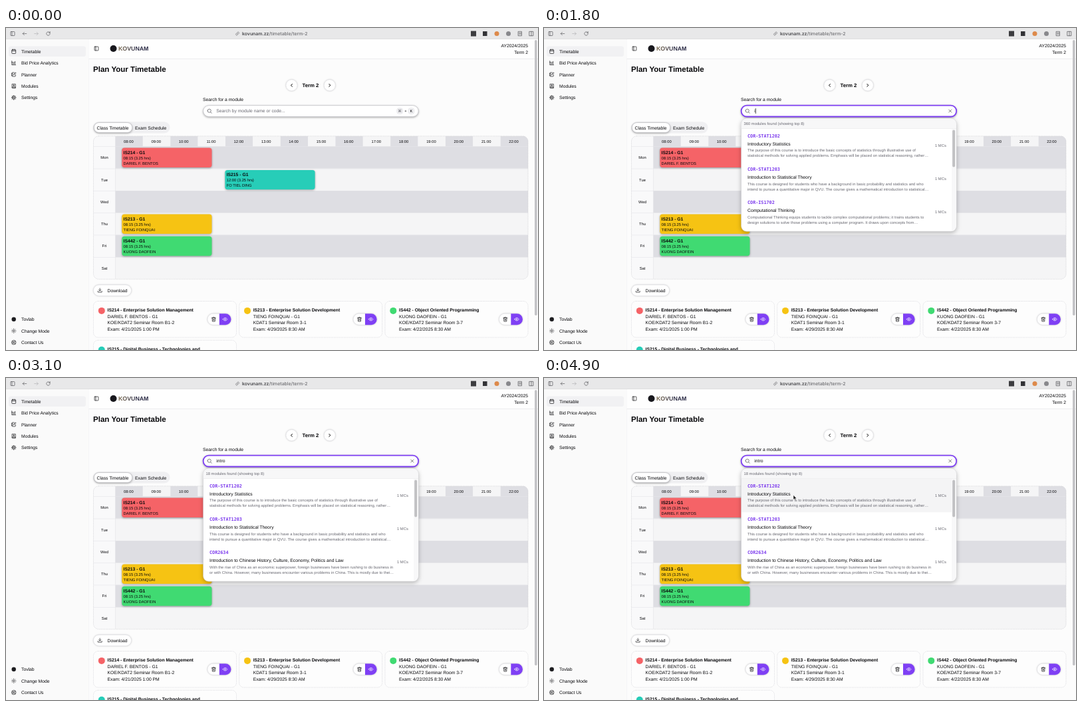
Recreate the animation shown at these times as an HTML page. Size 800 px wide and 485 px high, loop 5000 ms.

```html
<!DOCTYPE html>
<html lang="en">
<head>
<meta charset="utf-8">
<title>Plan Your Timetable</title>
<style>
html, body { margin: 0; width: 100%; height: 100%; overflow: hidden; background: #fcfcfc; }
svg { display: block; width: 800px; height: 485px; }
text { font-family: "Liberation Sans", Arial, sans-serif; font-size: 6.78px; fill: #08080b; white-space: pre; text-rendering: geometricPrecision; }
.b { font-weight: 700; }
.s { font-size: 5.82px; }
.l { font-size: 7.75px; }
.h { font-size: 11.55px; }
.logo { font-size: 8.8px; fill: url(#ink); }
.g { fill: #686871; }
.m { text-anchor: middle; }
.e { text-anchor: end; }
.code { font-family: "DejaVu Sans Mono", monospace; font-weight: 700; fill: #7c3aed; }
.url { font-family: Inter, sans-serif; font-weight: 500; font-size: 6.9px; fill: #6c6c70; }
.url tspan { font-weight: 600; fill: #48484c; }
.sh { filter: drop-shadow(0 .5px .8px #0003); }
.bar { filter: drop-shadow(.3px 1px 1.4px #0005); }
.pop { filter: drop-shadow(0 2px 3px #0004); }
</style>
</head>
<body>
<svg id="stage" viewBox="0 0 800 485"></svg>
<script>
const stage = document.getElementById('stage');
const PURPLE = '#7f40f4', RED = '#f56367', TEAL = '#27cdb8', GOLD = '#f6c313', GREEN = '#40da72';
const LINE = '#e0e0e4', GREY = '#dedee3', PALE = '#f5f5f6', INK = '#1c1c1f';

const box = (x, y, w, h, fill, r = 0, more = '') =>
  `<rect x="${x}" y="${y}" width="${w}" height="${h}" rx="${r}" fill="${fill}" ${more}/>`;
const edge = (color = LINE, w = .6) => `stroke="${color}" stroke-width="${w}"`;
const dashed = edge('#d2d2d7') + ' stroke-dasharray="1.5 1"';
const dot = (x, y, r, fill, more = '') => `<circle cx="${x}" cy="${y}" r="${r}" fill="${fill}" ${more}/>`;
const text = (x, y, str, cls = '') => `<text x="${x}" y="${y}" class="${cls}">${str}</text>`;
// icons live on a 24-unit grid centred on (x, y)
const icon = (x, y, d, size = 7.8, color = INK, w = 2.2) =>
  `<path transform="translate(${x - size / 2} ${y - size / 2}) scale(${size / 24})" d="${d}" fill="none" stroke="${color}" stroke-width="${w}" stroke-linecap="round" stroke-linejoin="round"/>`;
const ring = r => `M${12 - r} 12a${r} ${r} 0 1 0 ${2 * r} 0a${r} ${r} 0 1 0 ${-2 * r} 0`;
const rays = (a, b, n, turn = 0) => Array.from({ length: n }, (_, i) => {
  const q = (i + turn) / n * 2 * Math.PI, c = Math.cos(q), s = Math.sin(q);
  return `M${12 + a * c} ${12 + a * s}L${12 + b * c} ${12 + b * s}`;
}).join('');

const ICON = {
  calendar: 'M5 4h14a2 2 0 0 1 2 2v14a2 2 0 0 1-2 2H5a2 2 0 0 1-2-2V6a2 2 0 0 1 2-2zM8 2v4M16 2v4M3 10h18',
  chart: 'M3 3v18h18M8 17v-4M13 17V8M18 17V5M3 9h5',
  pen: 'M13 3H6a2 2 0 0 0-2 2v14a2 2 0 0 0 2 2h12a2 2 0 0 0 2-2v-6M2 7h4M2 12h4M2 17h4M20 3l2 2-8 8-3 1 1-3z',
  book: 'M5 3h15v19H6a2 2 0 0 1-2-2V4zM4 18h16M9 14l3-8 3 8M10 11.5h4',
  gear: ring(3) + ring(7.5) + rays(7.5, 10.5, 8),
  sun: ring(4) + rays(8, 10, 8),
  buoy: ring(10) + ring(4) + rays(4, 10, 4, .5),
  panel: 'M5 3h14a2 2 0 0 1 2 2v14a2 2 0 0 1-2 2H5a2 2 0 0 1-2-2V5a2 2 0 0 1 2-2zM9 3v18',
  split: 'M4 3h16v18H4zM12 3v18',
  list: 'M5 3h14v18H5zM8 9h8M8 14h8',
  back: 'M21 12H3M10 5l-7 7 7 7',
  forward: 'M3 12h18M14 5l7 7-7 7',
  reload: 'M20 12a8 8 0 1 1-3-6.2L20 8M20 3v5h-5',
  link: 'M10 14a5 5 0 0 0 7 0l3-3a5 5 0 0 0-7-7l-2 2M14 10a5 5 0 0 0-7 0l-3 3a5 5 0 0 0 7 7l2-2',
  left: 'M15 18l-6-6 6-6',
  right: 'M9 18l6-6-6-6',
  search: 'M3 11a8 8 0 1 0 16 0a8 8 0 1 0-16 0M17 17l5 5',
  close: 'M5 5l14 14M19 5L5 19',
  download: 'M12 3v12M7 10l5 5 5-5M3 16v5h18v-5',
  trash: 'M3 6h18M8 6V3h8v3M5 6l1 16h12l1-16M10 11v6M14 11v6',
  eye: 'M2 12c5-9 15-9 20 0c-5 9-15 9-20 0z' + ring(3)
};

function browserBar() {
  const c = '#5c5c60';
  return box(0, 0, 800, 17, '#e8e8e9') + box(0, 16.6, 800, .6, '#cfcfd1') +
    icon(10, 8.5, ICON.panel, 8, c) + icon(28, 8.5, ICON.back, 7.5, c) +
    icon(45.5, 8.5, ICON.forward, 7.5, '#b4b4b7') + icon(63.5, 8.5, ICON.reload, 8, c) +
    icon(348, 8.5, ICON.link, 6.5, c) + text(355, 11, '<tspan>kovunam.zz</tspan>/timetable/term-2', 'url') +
    box(699, 4.5, 8, 8, '#3c3c3f') + box(717, 5, 6.5, 7, '#333336') +
    dot(738, 8.5, 3.5, '#dd8a4b') + dot(755.5, 8.5, 3.5, '#88888c') +
    icon(773, 8.5, ICON.list, 8.5, c) + icon(790, 8.5, ICON.split, 8.5, c);
}

function sidebar() {
  const top = [['Timetable', 'calendar'], ['Bid Price Analytics', 'chart'], ['Planner', 'pen'], ['Modules', 'book'], ['Settings', 'gear']];
  const end = [['Tovlab'], ['Change Mode', 'sun'], ['Contact Us', 'buoy']];
  const items = (list, y0) => list.map(([name, key], i) => {
    const y = y0 + i * 17.4;
    return (key ? icon(11.7, y, ICON[key]) : dot(11.7, y, 3.2, INK)) + text(23, y + 2.5, name);
  }).join('');
  return box(0, 17, 124, 468, '#fafafa') + box(124, 17, .5, 468, '#ededf0') +
    box(4, 27.5, 116, 15.6, '#f1f1f3', 3) + items(top, 35.2) + items(end, 438.8);
}

function header() {
  const arrow = (x, key) => dot(x, 86.3, 8.5, '#fff', edge() + ' class="sh"') + icon(x, 86.3, ICON[key], 8, '#000', 3);
  return box(124.5, 17, 675.5, 29, '#fefefe') + box(124.5, 46, 675.5, .6, '#e4e4e7') +
    icon(136, 31, ICON.panel) + dot(161.5, 31, 5, '#17171c') + text(169, 34, 'KOVUNAM', 'b logo') +
    text(785, 29, 'AY2024/2025', 'e') + text(785, 38.5, 'Term 2', 'e') +
    text(131, 66, 'Plan Your Timetable', 'b h') +
    arrow(429.5, 'left') + arrow(486.8, 'right') + text(458, 89, 'Term 2', 'b l m') +
    text(296, 110, 'Search for a module') +
    box(131, 141.3, 115.5, 17.2, '#f0f0f2', 8.6) +
    box(132.3, 142.5, 57.5, 15, '#fff', 7.5, edge('#b5b5ba') + ' class="bar"') +
    text(136.5, 152.5, 'Class Timetable') + text(194, 152.5, 'Exam Schedule');
}

function timetable() {
  const X = 164.5, Y = 178.5, COL = 41.37, ROW = 33.3;
  let out = box(131.5, 162.8, 653.5, 215.5, '#f9f9fa');
  for (let i = 0; i < 15; i++) {
    out += box(X + i * COL, 162.8, COL, 15.7, i % 2 ? PALE : GREY) +
      text(X + (i + .48) * COL, 173, String(i + 8).padStart(2, '0') + ':00', 's m');
  }
  ['Mon', 'Tue', 'Wed', 'Thu', 'Fri', 'Sat'].forEach((day, i) => {
    const y = Y + i * ROW;
    out += box(X, y, 620.5, ROW, i % 2 ? PALE : GREY) + box(131.5, y, 653.5, .5, '#e0e0e4') + text(148, y + 18.7, day, 's m');
  });
  out = `<g clip-path="url(#table)">${out}${box(X - .3, 162.8, .5, 215.5, '#e0e0e4')}</g>` +
    box(131.5, 162.8, 653.5, 215.5, 'none', 8, edge('#c9c9ce') + ' stroke-dasharray="1.5 1"');
  const lesson = (row, x, color, code, time, who) => {
    const y = Y + row * ROW + 2.1;
    return box(x, y, 135.2, 29.4, color, 3.7, 'class="bar"') + text(x + 2.3, y + 9.4, code + ' - G1', 'b') +
      text(x + 2.3, y + 17.4, time + ' (3.25 hrs)', 's') + text(x + 2.3, y + 25.3, who, 's');
  };
  return out + lesson(0, 174.3, RED, 'IS214', '08:15', 'DARIEL F. BENTOS') +
    lesson(1, 329.4, TEAL, 'IS215', '12:00', 'FO TIEL DING') +
    lesson(3, 174.3, GOLD, 'IS213', '08:15', 'TIENG FOINQUAI') +
    lesson(4, 174.3, GREEN, 'IS442', '08:15', 'KUONG DAOFEIN');
}

function card(x, y, color, lines) {
  const cy = y + 27.2;
  return box(x, y, 215, 54.5, '#fdfdfd', 7, dashed) + dot(x + 12.3, y + 14.4, 5, color) +
    lines.map((s, i) => text(x + 21, y + 15.3 + i * 9.7, s, i ? '' : 'b')).join('') +
    box(x + 171.5, cy - 8.5, 35.5, 17, '#fff', 8.5, edge() + ' class="sh"') +
    `<path d="M${x + 189.3} ${cy - 8.5}h9.2a8.5 8.5 0 0 1 0 17h-9.2z" fill="${PURPLE}"/>` +
    icon(x + 180.8, cy, ICON.trash) + icon(x + 198, cy, ICON.eye, 7.8, '#fff');
}

function cards() {
  return box(131.5, 387, 57, 16.5, '#fff', 8.2, edge() + ' class="sh"') + icon(141.2, 395, ICON.download) + text(152.5, 397.5, 'Download') +
    card(131.5, 411.5, RED, ['IS214 - Enterprise Solution Management', 'DARIEL F. BENTOS - G1', 'KOE/KDAT2 Seminar Room B1-2', 'Exam: 4/21/2025 1:00 PM']) +
    card(350.7, 411.5, GOLD, ['IS213 - Enterprise Solution Development', 'TIENG FOINQUAI - G1', 'KDAT1 Seminar Room 3-1', 'Exam: 4/29/2025 8:30 AM']) +
    card(570, 411.5, GREEN, ['IS442 - Object Oriented Programming', 'KUONG DAOFEIN - G1', 'KOE/KDAT2 Seminar Room 3-7', 'Exam: 4/22/2025 8:30 AM']) +
    card(131.5, 470.3, TEAL, ['IS215 - Digital Business - Technologies and']) +
    box(795, 18, 3.6, 415, '#c3c3c6', 1.8);
}

const MODULES = {
  stats: ['COR-STAT1202', 'Introductory Statistics',
    'The purpose of this course is to introduce the basic concepts of statistics through illustrative use of',
    'statistical methods for solving applied problems. Emphasis will be placed on statistical reasoning, rather…'],
  theory: ['COR-STAT1203', 'Introduction to Statistical Theory',
    'This course is designed for students who have a background in basic probability and statistics and who',
    'intend to pursue a quantitative major in QVU. The course gives a mathematical introduction to statistical…'],
  thinking: ['COR-IS1702', 'Computational Thinking',
    'Computational Thinking equips students to tackle complex computational problems; it trains students to',
    'design solutions to solve those problems using a computer program. It draws upon concepts from…'],
  law: ['COR-LAW2215', 'Digital Intelligence for Lawyers',
    'This course employs a top-down approach to introduce high-level concepts in digital technology to (1) future',
    'lawyers who expect to work closely on legal/policy matters that intersect with technology and (2) future le…'],
  china: ['COR2634', 'Introduction to Chinese History, Culture, Economy, Politics and Law',
    'With the rise of China as an economic superpower, foreign businesses have been rushing to do business in',
    'or with China. However, many businesses encounter various problems in China. This is mostly due to thei…']
};

// time, typed text, hits, third result
const KEYS = [
  [1600, 'i', 360, 'thinking'], [1900, 'in', 288, 'thinking'], [2000, 'int', 96, 'thinking'],
  [2100, 'intr', 47, 'law'], [2300, 'intro', 18, 'china']
];
const FOCUS = 1200;

function dropdown(hits, third, hover) {
  const rows = ['stats', 'theory', third].map((key, i) => {
    const [code, name, a, b] = MODULES[key], y = 152 + i * 50.2;
    return (hover && !i ? box(297, y, 316, 50.2, '#f4f4f5') : '') + text(306, y + 12.8, code, 'code') +
      text(306, y + 24.7, name) + text(306, y + 34.4, a, 's g') + text(306, y + 42.3, b, 's g') + text(588, y + 27, '1 MCs', 's g');
  }).join('');
  return box(296.6, 136.3, 323.6, 170, '#fff', 8, edge('#d0d0d5') + ' class="pop"') +
    `<g clip-path="url(#menu)">${box(296, 136, 325, 15.6, '#f7f7f8')}${box(296, 151.5, 325, .5, '#e4e4e7')}` +
    rows + box(613, 152, 8, 155, '#f8f8f9') + box(614.2, 153.5, 3.9, 56, '#c1c1c3', 1.9) + '</g>' +
    text(300.5, 145.7, hits + ' modules found (showing top 8)', 's g');
}

function searchBox(t, typed) {
  const on = t >= FOCUS;
  const since = t - (typed ? Math.min(t, 2400) : FOCUS);
  const caret = on && since % 1000 < 500;
  const width = [0, 1.5, 5.3, 7.2, 9.5, 13.3][typed.length];
  let out = box(296.6, 116.7, 323.6, 16.8, '#fff', 8.4, (on ? edge(PURPLE, 1.8) : edge('#c4c4c9', .8)) + ' class="bar"') +
    icon(306, 125, ICON.search, 7.8, '#55555c');
  if (typed) out += text(316.3, 127.4, typed) + icon(610.8, 125, ICON.close, 7, '#333338');
  else {
    out += text(316.3, 127.4, 'Search by module name or code...', 'g') +
      box(587.8, 120.7, 8.8, 8.6, '#f0f0f2', 3, edge()) + text(592.2, 127, '⌘', 's g m') +
      text(601, 127, '+', 's m') + box(605, 120.7, 8.8, 8.6, '#f0f0f2', 3, edge()) + text(609.4, 127, 'K', 's m');
  }
  return out + (caret ? box(316.4 + width, 121, .7, 8, '#111') : '');
}

function pointer(t) {
  const move = (from, to, start, end) => {
    const p = Math.min(1, (t - start) / (end - start)), k = 1 - (1 - p) ** 2;
    return from.map((v, i) => v + (to[i] - v) * k);
  };
  const field = [360, 123.6];
  if (t >= 700 && t < KEYS[0][0]) return move([430, 488], field, 700, 1200);
  if (t >= 4400) return move(field, [375, 176.4], 4400, 4900);
}

const arrow = ([x, y]) =>
  `<path transform="translate(${x} ${y})" d="M0 0V6.8L1.6 5.4L2.7 8L3.8 7.5L2.7 5H4.9Z" fill="#111" stroke="#fff" stroke-width=".5"/>`;

stage.innerHTML = `<defs>
  <linearGradient id="ink"><stop stop-color="#7b6a4f"/><stop offset=".6" stop-color="#33334a"/><stop offset="1" stop-color="#23233f"/></linearGradient>
  <clipPath id="table">${box(131.5, 162.8, 653.5, 215.5, '#000', 8)}</clipPath>
  <clipPath id="menu">${box(296.8, 136.5, 323.2, 169.6, '#000', 8)}</clipPath>
</defs>` + box(0, 0, 800, 485, '#fcfcfc') + browserBar() + sidebar() + header() + timetable() + cards() + '<g id="live"></g>';
const live = document.getElementById('live');

let shown = -1;
function draw(now) {
  const t = Math.floor(now % 5000 / 100) * 100;
  if (t !== shown) {
    shown = t;
    const [, typed, hits, third] = KEYS.filter(k => k[0] <= t).pop() || [0, ''];
    const tip = pointer(t);
    live.innerHTML = searchBox(t, typed) + (typed ? dropdown(hits, third, tip && tip[1] > 152) : '') + (tip ? arrow(tip) : '');
  }
  requestAnimationFrame(draw);
}
draw(performance.now());
</script>
</body>
</html>
```
